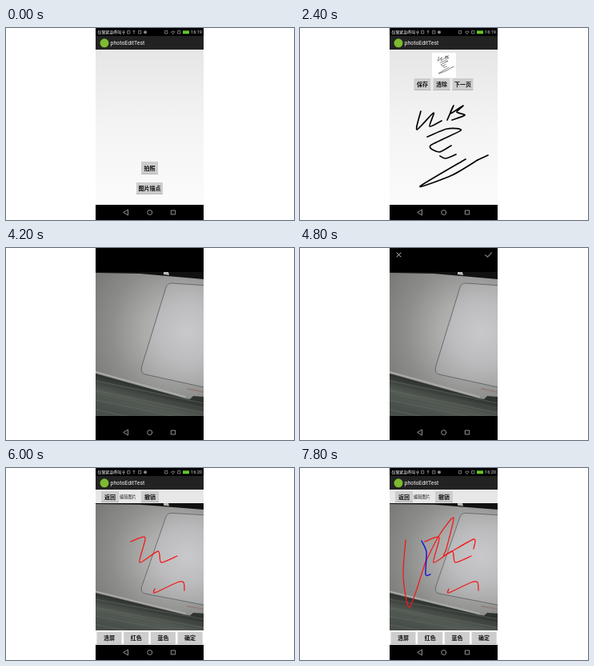
These frames come from a looping animation (360x240 px, 8000 ms). An HTML page with a canvas:

```html
<!DOCTYPE html>
<html lang="zh">
<meta charset="utf-8">
<style>
html, body { margin: 0; width: 360px; height: 240px; overflow: hidden; background: #fff; }
canvas { display: block; }
</style>
<canvas width="360" height="240"></canvas>
<script>
const c = document.querySelector('canvas').getContext('2d');
const FONT = 'Roboto, "Noto Sans CJK SC", "Noto Sans CJK", sans-serif';
const LEFT = 112, WIDTH = 135, NAV = 221;

function rect(x, y, w, h, fill) {
  c.fillStyle = fill;
  c.fillRect(x, y, w, h);
}
function disc(x, y, r, fill) {
  c.beginPath();
  c.arc(x, y, r, 0, 7);
  c.fillStyle = fill;
  c.fill();
}
function text(s, x, y, size, fill = '#222', weight = 400, align = 'left') {
  c.font = `${weight} ${size}px ${FONT}`;
  c.fillStyle = fill;
  c.textAlign = align;
  c.fillText(s, x, y);
}
function fillPath(d, fill) {
  c.fillStyle = fill;
  c.fill(new Path2D(d));
}
function line(d, color, width = 1) {
  c.strokeStyle = color;
  c.lineWidth = width;
  c.lineCap = c.lineJoin = 'round';
  c.stroke(new Path2D(d));
}
function addStops(gradient, colors) {
  colors.forEach((col, i) => gradient.addColorStop(i / (colors.length - 1), col));
  return gradient;
}
const shade = (x0, y0, x1, y1, ...colors) => addStops(c.createLinearGradient(x0, y0, x1, y1), colors);
const glow = (x, y, r, ...colors) => addStops(c.createRadialGradient(x, y, 0, x, y, r), colors);

// Smooth curve through a few key points
function smooth(list) {
  const p = list.split(' ').map(s => s.split(',').map(Number));
  const at = i => p[Math.max(0, Math.min(p.length - 1, i))];
  const handle = (i, side) => at(i).map((v, k) => v + side * (at(i + 1)[k] - at(i - 1)[k]) / 8);
  return 'M' + p[0] + p.slice(1).map((q, i) => `C${handle(i, 1)} ${handle(i + 1, -1)} ${q}`).join('');
}

// Each pen stroke appears at a set time
const stroke = (start, points) => ({ start, d: smooth(points) });
const signature = [
  stroke(1200, '151,104 146,127 167,106 162,123 177,116'),
  stroke(1200, '184,115 192,97 188,107 204,97 196,105 206,109 190,115'),
  stroke(1800, '159,136 184,126 201,128 163,147 174,155 189,147'),
  stroke(1800, '175,160 182,163 195,158'),
  stroke(1800, '207,164 150,198 190,184 222,165'),
  stroke(2400, '222,165 235,159')
];
const redMarks = [
  stroke(6000, '156,92 174,87 167,118 190,104 194,118 214,110'),
  stroke(6000, '186,151 186,156 214,143 222,143 223,153'),
  stroke(6600, '132,90 129,136 137,174 157,117'),
  stroke(7200, '157,117 174,84 192,62 183,101 181,109 217,89 217,101')
];
const blueMarks = [stroke(7800, '152,91 158,105 157,133 163,133')];

function ink(strokes, t, color, width) {
  strokes.filter(s => t >= s.start).forEach(s => line(s.d, color, width));
}

function button(label, x, y, w, h = 15) {
  rect(x, y, w, h, '#cdcdcd');
  rect(x, y + h - 1, w, 1, '#b5b5b5');
  text(label, x + w / 2, y + h / 2 + 2.6, 7, '#111', 700, 'center');
}

function navBar() {
  rect(LEFT, NAV, WIDTH, 240 - NAV, '#000');
  const col = '#b5b5b5';
  line('M152.5 227.5v6.5l-5.5-3.3Z', col, .8);
  c.beginPath();
  c.arc(179.7, 230.6, 3, 0, 7);
  c.stroke();
  c.strokeRect(206.7, 228, 5, 5);
}

function appFrame(clock) {
  rect(LEFT, 0, WIDTH, 10, '#000');
  rect(LEFT, 10, WIDTH, 17.5, '#222');
  rect(LEFT, 27, WIDTH, NAV - 27, shade(0, 27, 0, NAV, '#e6e6e6', '#f4f4f4', '#fbfbfb'));
  text('仅限紧急呼叫', 114.5, 7.2, 4.95, '#fff', 500);
  const col = '#aaa';
  line('M147 3v5m-1.2-3.5v1.5h2.4v-1.5M160 3v4m-1-3h2', col, .7);
  for (const x of [152, 166, 199, 215]) c.strokeRect(x, 3.5, 2.8, 3.5);
  line('M207 4.6q2-1.6 4 0l-2 2.7Z', col, .7);
  disc(174, 5.3, 2, '#888');
  rect(221, 3.3, 8, 4, '#65c72b');
  text(clock, 231, 7.4, 5.6, '#ddd');
  disc(123, 18.8, 5.5, '#7fba30');
  text('photoEditTest', 130.6, 21.2, 6.9, '#f3f3f3');
}

function home() {
  appFrame('16:19');
  button('拍照', 169, 167, 21, 16);
  button('图片描点', 163, 193, 33);
}

function signPage(t) {
  appFrame('16:19');
  const saved = t >= 2400;
  rect(165, 31, 30, 31, saved ? '#fff' : '#f83b80');
  if (saved) {
    c.save();
    c.translate(165, 31);
    c.scale(.222, .218);
    c.translate(-LEFT, -80);
    ink(signature, t, '#000', 2.3);
    c.restore();
  }
  button('保存', 142.5, 63, 21);
  button('清除', 166.5, 63, 21);
  button('下一页', 190.5, 63, 26);
  ink(signature, t, '#000', 1.7);
}

// Laptop on a table, drawn in a 135 by 180 box
function photo(y, h) {
  c.save();
  c.translate(LEFT, y);
  c.scale(1, h / 180);
  c.beginPath();
  c.rect(0, 0, WIDTH, 180);
  c.clip();
  rect(0, 0, WIDTH, 180, shade(55, 143, 45, 180, '#2f3330', '#555b55', '#484e49'));
  for (let i = 0; i < 9; i++) line(`M0 ${136 + i * 6}L135 ${164 + i * 6}`, i % 2 ? '#4b514c' : '#636963', .7);
  rect(0, 0, WIDTH, 9, '#111');
  fillPath('M85 0h6l1 4l-7-1Z', '#bbb');
  fillPath('M0 1L55 2L135 9V156L122 155L118 159L112 158L0 127Z',
    glow(105, 75, 130, '#bebebe', '#acacab', '#8c8d8b', '#777876'));
  line('M0 125L112 156', '#aaaba7', 2);
  const pad = 'M140 17L95 14Q90 14 88 19L58 117Q55 126 62 128L140 145Z';
  fillPath(pad, glow(115, 75, 75, '#c9c9cd', '#bcbcbe', '#a3a3a3'));
  line(pad, '#555a5b', .8);
  line('M115 146L135 150', '#917f79', 2);
  c.restore();
}

function camera(t) {
  rect(LEFT, 0, WIDTH, NAV, '#000');
  if (t >= 4200) photo(30, 180);
  if (t >= 4800) line('M121 6l5 5m0-5l-5 5M231.8 8.8l2.7 2.5l5-5.5', '#ddd', .9);
}

function editor(t) {
  appFrame('16:20');
  button('返回', 119, 29, 22, 14);
  text('编辑图片', 142, 38, 5.2);
  button('撤销', 169, 29, 22, 14);
  photo(44, 159);
  ['清屏', '红色', '蓝色', '确定'].forEach((s, i) => button(s, 113.5 + i * 33.7, 205, 31));
  ink(redMarks, t, '#f51818', 1.3);
  ink(blueMarks, t, '#1710dc', 1.4);
}

function draw(now) {
  const t = now % 8000;
  rect(0, 0, 360, 240, '#fff');
  if (t < 600) home();
  else if (t < 3600) signPage(t);
  else if (t < 6000) camera(t);
  else editor(t);
  navBar();
  requestAnimationFrame(draw);
}
draw(performance.now());
</script>
</html>
```
